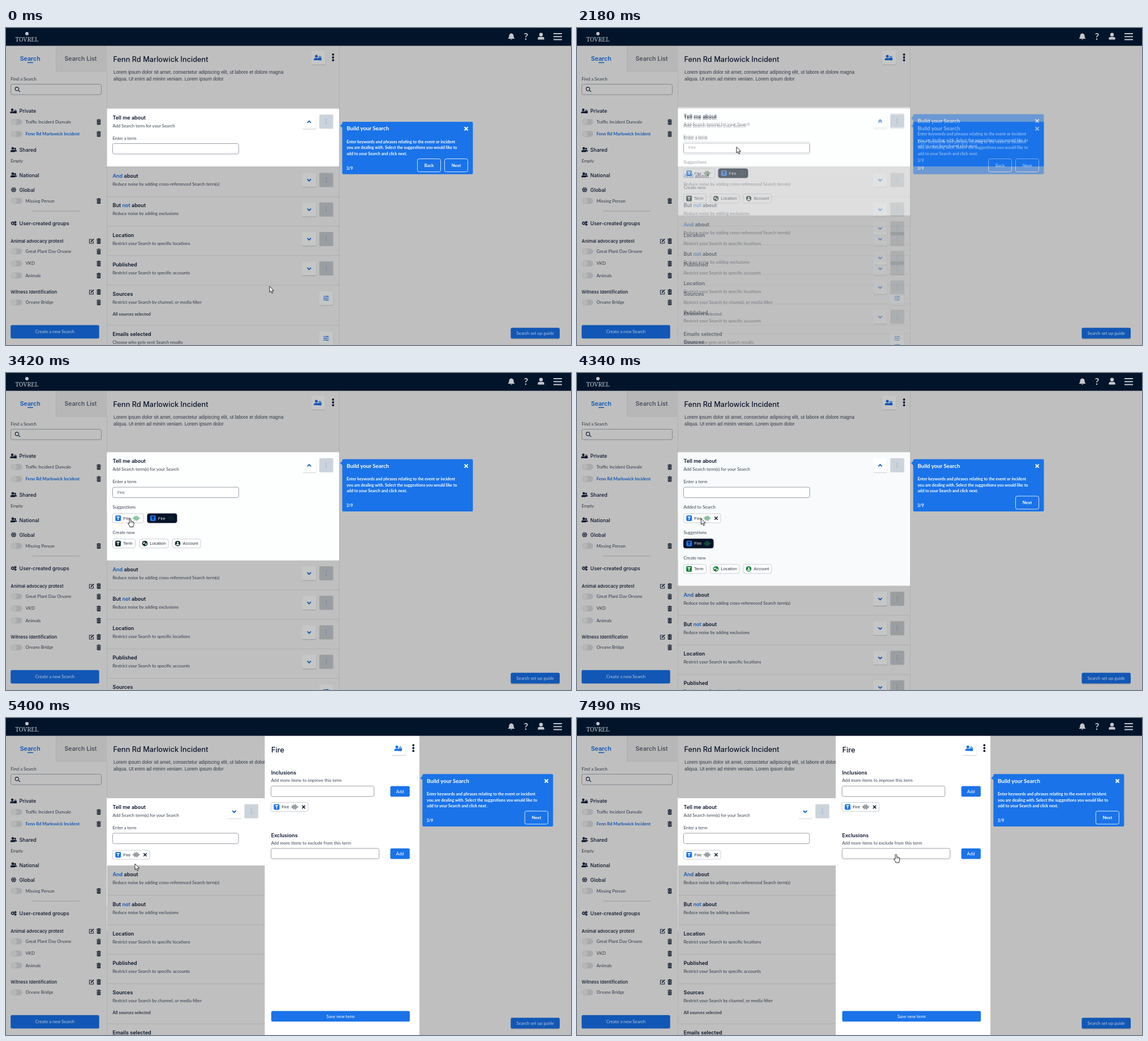
An HTML page that plays this animation: 999 by 561 pixels, repeating every 8000 ms.

```html
<!DOCTYPE html>
<html lang="en">
<head>
<meta charset="utf-8">
<title>Search builder</title>
<style>
  html, body { margin: 0; width: 100%; height: 100%; overflow: hidden; background: #bfbfbf; }
  svg { display: block; width: 100%; height: 100%; }
  text { white-space: pre; }
</style>
</head>
<body>
<svg id="stage" viewBox="0 0 999 561"></svg>
<script>
const NAVY = '#0c162c', BODY = '#303846', BLUE = '#1a73e8', DIM_BLUE = '#1257b5';
const DIM = '#bfbfbf', DIM_BOX = '#c5c6c6', LINE = '#adaeaf';

const fonts = {
  title: ['Inter', 500, 12.75], tab: ['Inter', 600, 10.65], head: ['Inter', 600, 9.05],
  side: ['Inter', 500, 8.9], group: ['Inter', 500, 7.9],
  body: ['Lato', 400, 7.75], bold: ['Lato', 700, 7.7],
  tipTitle: ['Lato', 700, 9.7], tip: ['Lato', 700, 7.2],
  plain: ['Liberation Sans', 400, 8.36], chip: ['Liberation Sans', 400, 7.5],
  brand: ['Noto Serif', 400, 10.5], help: ['Lato', 700, 17]
};

// Drawing helpers; text is placed by the vertical centre of its capitals.
const text = (kind, x, y, str, fill = NAVY, anchor = 'start') => {
  const [family, weight, size] = fonts[kind];
  return `<text x="${x}" y="${y + size * .355}" font-family="${family}, sans-serif" font-weight="${weight}" font-size="${size}" fill="${fill}" text-anchor="${anchor}">${str}</text>`;
};
const rect = (x, y, w, h, fill, r = 0, stroke = 'none') =>
  `<rect x="${x}" y="${y}" width="${w}" height="${h}" rx="${r}" fill="${fill}" stroke="${stroke}"/>`;
const circle = (x, y, r, fill) => `<circle cx="${x}" cy="${y}" r="${r}" fill="${fill}"/>`;
const fillPath = (d, fill) => `<path d="${d}" fill="${fill}"/>`;
const stroke = (d, color, w = 1) => `<path d="${d}" fill="none" stroke="${color}" stroke-width="${w}"/>`;
const at = (x, y, body, scale = 1) => `<g transform="translate(${x} ${y}) scale(${scale})">${body}</g>`;
const input = (x, y, w) => rect(x, y, w, 18.5, '#fff', 3, '#9a9fa8');
const button = (x, y, w, h, label, fill, color) =>
  rect(x, y, w, h, fill, 2.5) + text('body', x + w / 2, y + h / 2, label, color, 'middle');

// Icons, centred on their position.
const cross = (x, y, s, color, w = 1.8) => at(x, y, stroke(`M${-s} ${-s}L${s} ${s}M${s} ${-s}L${-s} ${s}`, color, w));
const chevron = (x, y, up, color) => at(x, y, stroke(up ? 'M-3.2 1.6L0-1.6 3.2 1.6' : 'M-3.2-1.6L0 1.6 3.2-1.6', color, 1.9));
const dots = (x, y, color, gap = 4, r = 1.2) => [-gap, 0, gap].map(d => circle(x, y + d, r, color)).join('');
const person = (x, y, color, s = 1) => at(x, y, circle(0, -2.4, 2.3, color) + fillPath('M-4 4V2.5Q-4 .5-2 .5H2Q4 .5 4 2.5V4Z', color), s);
const people = (x, y, color) => person(x + 2.6, y, color, .75) + person(x - 1.6, y, color);
const lockedPeople = (x, y, color, s = 1) => at(x, y, person(-2, 0, color) +
  rect(1.2, -.2, 5, 4.4, color, .6) + stroke('M2.3 0V-1.4Q3.7-3.4 5.1-1.4V0', color), s);
const globe = (x, y, color) => at(x, y, circle(0, 0, 4.3, color) +
  stroke('M-4.3-1.4H4.3M-4.3 1.4H4.3M0-4.3Q-3.6 0 0 4.3Q3.6 0 0-4.3', DIM, .7));
const gear = (x, y, r, color) =>
  `<circle cx="${x}" cy="${y}" r="${r}" fill="none" stroke="${color}" stroke-width="1.3"/>` +
  `<circle cx="${x}" cy="${y}" r="${r + .9}" fill="none" stroke="${color}" stroke-width=".8" stroke-dasharray="1.1 1"/>`;
const trash = y => at(164, y, fillPath('M-3.8-4H-1.5L-1-5H1L1.5-4H3.8V-2.8H-3.8ZM-3.2-2.2H3.2V4Q3.2 5 2.2 5H-2.2Q-3.2 5-3.2 4Z', '#1c2536') +
  stroke('M-1.4-1V3.6M1.4-1V3.6', DIM, .7));
const pencil = y => at(151, y, stroke('M1-3H-3.5V4H3.5V0', '#1c2536', 1.1) + stroke('M-1 1.5L4-3.6', '#1c2536', 2));
const sliders = (x, y, color) => at(x, y, stroke('M-5-3.2H5M-5 0H5M-5 3.2H5', color, 1) +
  stroke('M2-4.4V-2M-2-1.2V1.2M1 2V4.4', color, 1.3));
const wave = (x, y, color) => `<g class="wave" stroke="${color}" stroke-width=".9">` + at(x, y,
  [1, 2.4, 4.4, 3, 5, 3.6, 2, .8].map((h, i) => `<path d="M${i * 1.6 - 5.6} ${-h}V${h}"/>`).join('')) + '</g>';

const raised = (x, y, icon, fill) => rect(x + .4, y + 1, 24.2, 24.6, 'rgba(0,0,0,.18)', 2) + rect(x, y, 24.5, 24.5, fill, 2) + icon;
const chevronBox = (x, y, up, lit) =>
  raised(x, y, chevron(x + 12.2, y + 12.4, up, lit ? '#1660cc' : DIM_BLUE), lit ? '#fff' : DIM_BOX);
const kebabBox = (x, y, lit) => rect(x, y, 24.5, 25, lit ? '#ccd3da' : '#9b9ea1', 1.5) +
  dots(x + 12.2, y + 12.5, lit ? '#8fb4e2' : '#6d88ad', 3.7, 1.1);

const tIcon = (x, y, color, ink = '#fff') => rect(x - 5, y - 5, 10, 10, color, 2) + at(x, y, stroke('M-2.6-2.3H2.6M0-2.3V3', ink, 1.5));
const chip = (x, y, w, { dark, waveColor, closable }) =>
  rect(x, y, w, 16, dark ? '#051328' : '#fff', 3, dark ? '#051328' : '#c9ced4') +
  tIcon(x + 9.8, y + 8, BLUE, dark ? '#051328' : '#fff') +
  text('chip', x + 18.8, y + 8, 'Fire', dark ? '#e4e9f0' : '#2b3442') + wave(x + 41.8, y + 8, waveColor) +
  (closable ? cross(x + 57.5, y + 8, 2.7, NAVY, 1.5) : '');

const createRow = (y, color) => [['Term', 188.5, 40], ['Location', 236, 51], ['Account', 294, 50]].map(([label, x, w], i) => {
  const cx = x + 9.6, cy = y + 8;
  const icon = i === 0 ? tIcon(cx, cy, color) : circle(cx, cy, 4.8, color) +
    (i === 1 ? at(cx, cy, fillPath('M-3.5-1L-.5-3 0-.5-2 1ZM1-.5L3.6 0 2 3 .5 2Z', '#fff')) : person(cx, cy + .4, '#fff', .65));
  return rect(x, y, w, 16, '#fff', 3, '#c9ced4') + icon + text('chip', x + 18.5, cy, label, '#2b3442');
}).join('');

const toggleRow = (y, label, selected) => rect(8.5, y - 5.2, 20, 10.4, '#a8a9aa', 5.2) + circle(14, y, 5, '#b6b7b7') +
  text(selected ? 'bold' : 'body', 34.6, y, label, selected ? DIM_BLUE : BODY) + trash(y);

const CASE_NAME = 'Fenn Rd Marlowick Incident';

function header() {
  const ink = '#c3c7cc';
  return rect(0, 0, 999, 31.5, '#01142a') + circle(37, 10, 3, ink) + text('brand', 37, 20, 'TOVREL', ink, 'middle') +
    at(893.5, 15, fillPath('M-6 4Q-4 2-4-1Q-4-5 0-5.6Q4-5 4-1Q4 2 6 4ZM-1.6 4.8H1.6Q0 7.4-1.6 4.8Z', ink)) +
    text('help', 919.5, 15.3, '?', ink, 'middle') + person(946, 15, ink, 1.4) +
    stroke('M968 10H983M968 15.2H983M968 20.4H983', ink, 2);
}

function sidebar() {
  const heading = (y, label) => text('side', 23.6, y, label);
  const group = (y, label) => text('group', 8.3, y, label) + pencil(y) + trash(y);
  return rect(88.5, 32, 90, 44.5, '#b7b7b7') + stroke('M88.5 32V76.5H178.5V561', LINE) +
    text('tab', 42.7, 54, 'Search', DIM_BLUE, 'middle') + rect(38, 60.5, 10, 1.5, DIM_BLUE) +
    text('tab', 132, 54, 'Search List', '#4b525c', 'middle') +
    text('body', 8.3, 90, 'Find a Search', BODY) + rect(8.5, 99.5, 160, 18.5, DIM, 3, '#80858d') +
    at(20, 108.5, stroke('M2.2 1.8L5 4.6M2.6-.7A3.2 3.2 0 1 1-3.8-.7A3.2 3.2 0 1 1 2.6-.7', NAVY, 1.1)) +
    lockedPeople(13, 147, NAVY, .95) + heading(147, 'Private') +
    toggleRow(166.3, 'Traffic Incident Dunvale') + toggleRow(187.5, CASE_NAME, true) +
    people(13.5, 215.5, NAVY) + heading(215.7, 'Shared') + text('body', 8.3, 235, 'Empty', BODY) +
    people(13.5, 260.3, NAVY) + heading(260.5, 'National') +
    globe(13.5, 286.3, NAVY) + heading(286.6, 'Global') + toggleRow(306, 'Missing Person') +
    stroke('M46 324H130', '#979a9c') +
    gear(11.8, 345.5, 2, NAVY) + gear(16.5, 343.6, 1, NAVY) + gear(16.5, 347.8, 1, NAVY) + heading(345.7, 'User-created groups') +
    group(377, 'Animal advocacy protest') + toggleRow(395.4, 'Great Plant Day Orvane') +
    toggleRow(416.7, 'VKD') + toggleRow(438, 'Animals') +
    group(467, 'Witness Identification') + toggleRow(485.6, 'Orvane Bridge') +
    button(8.2, 525.7, 156.5, 23.7, 'Create a new Search', DIM_BLUE, '#b9c6d8');
}

function sections(dy) {
  const blue = word => `<tspan fill="${DIM_BLUE}">${word}</tspan>`;
  const folded = [
    [blue('And') + ' about', 'Reduce noise by adding cross-referenced Search term(s)'],
    [`But ${blue('not')} about`, 'Reduce noise by adding exclusions'],
    ['Location', 'Restrict your Search to specific locations'],
    ['Published', 'Restrict your Search to specific accounts']
  ].map(([name, note], i) => {
    const y = 262 + 52.2 * i;
    return text('head', 188.5, y, name) + text('body', 188.5, y + 14.4, note, BODY) +
      chevronBox(523.8, y - 5.3, false) + kebabBox(554, y - 5.5) + stroke(`M179 ${y + 36.4}H589`, LINE);
  }).join('');
  const filter = (y, name, note) => text('head', 188.5, y, name) + text('body', 188.5, y + 14.4, note, BODY) +
    raised(554, y - 4.7, sliders(566, y + 7.5, DIM_BLUE), DIM_BOX);
  return at(0, dy, folded + filter(470.6, 'Sources', 'Restrict your Search by channel, or media filter') +
    text('bold', 188.5, 506, 'All sources selected', BODY) + stroke('M179 526H589', LINE) +
    filter(541.7, 'Emails selected', 'Choose who gets sent Search results'));
}

function tooltip(x, y, labels) {
  const lines = ['Enter keywords and phrases relating to the event or incident',
    'you are dealing with. Select the suggestions you would like to', 'add to your Search and click next.'];
  const outlined = label => {
    const bx = label === 'Back' ? 133 : 181;
    return rect(bx, 65.5, 41, 23, 'none', 3, '#d5e4fb') + text('bold', bx + 20.6, 76.8, label, '#fff', 'middle');
  };
  return at(x, y, rect(0, 0, 231, 92.7, BLUE, 2) + fillPath('M.5 3L-3.8 7 .5 11Z', BLUE) +
    text('tipTitle', 7.7, 11.8, 'Build your Search', '#fff') + cross(219.2, 12.2, 3, '#fff', 2) +
    lines.map((line, i) => text('tip', 7.7, 35.5 + 10.4 * i, line, '#fff')).join('') +
    text('tip', 7.2, 82.4, '3/9', '#fff') + labels.map(outlined).join(''));
}

function scene({ top, bottom, shift, dy, fill = '#fff', plural = true, compact, content, tip }) {
  const bx = compact ? 391.3 : 523.8;
  return rect(179, 32, 820, 529, DIM) + stroke('M589 32V561', LINE) +
    text('title', 189.5, 55, CASE_NAME) +
    text('plain', 190, 78, 'Lorem ipsum dolor sit amet, consectetur adipiscing elit, ut labore et dolore magna', BODY) +
    text('plain', 190, 90.4, 'aliqua. Ut enim ad minim veniam. Lorem ipsum dolor', BODY) +
    raised(540, 40.2, lockedPeople(551, 52.6, DIM_BLUE, 1.1), DIM_BOX) + dots(578.3, 52, NAVY, 5, 1.9) +
    sections(dy) + rect(178.5, top, 410.5, bottom - top, fill) +
    at(0, shift, text('head', 188.5, 158.4, 'Tell me about') +
      text('body', 188.5, 173, `Add Search term${plural ? '(s)' : ''} for your Search`, '#3a4452') +
      chevronBox(bx, 153.8, !compact, true) + kebabBox(bx + 30.2, 153.2, true) +
      text('body', 188.5, 195, 'Enter a term', '#3a4452') + input(188.5, 204.5, compact ? 222.5 : 223)) +
    content + tooltip(...tip) +
    rect(892.3, 531, 87, 20, 'rgba(0,0,0,.15)', 3) +
    button(892.5, 530.5, 86.5, 19, 'Search set up guide', DIM_BLUE, '#b9c6d8');
}

function termPanel() {
  const block = (y, name, note, w) => text('head', 468.7, y, name) + text('body', 468.7, y + 13.7, note, '#3a4452') +
    input(468.7, y + 23.4, w) + button(679.5, y + 23.5, 34.3, 18.7, 'Add', BLUE, '#fff');
  return rect(457.5, 31.5, 273.5, 529.5, '#fff') + text('title', 469, 56, 'Fire') +
    raised(682, 41.3, lockedPeople(693.3, 53.8, BLUE, 1.1), '#fff') + dots(720.3, 53.2, NAVY, 5, 1.9) +
    block(97, 'Inclusions', 'Add more items to improve this term', 182) +
    chip(468.7, 149.4, 65.5, { closable: true, waveColor: '#4a535f' }) +
    block(207.3, 'Exclusions', 'Add more items to exclude from this term', 191) +
    button(469, 518.5, 245, 18.7, 'Save new term', BLUE, '#fff');
}

const label = (y, str) => text('body', 188.5, y, str, '#3a4452');
const scenes = [
  scene({ top: 142.7, bottom: 245, shift: 0, dy: 0, plural: false, content: '', tip: [594.5, 166, ['Back', 'Next']] }),
  scene({ top: 140.2, bottom: 331.7, shift: -2.4, dy: 85.5, fill: '#fdfefe', tip: [594.5, 152.4, []],
    content: text('chip', 197, 211.4, 'Fire', '#59616c') + label(237.6, 'Suggestions') +
      chip(188.5, 249, 55, { waveColor: '#1d4d38' }) + chip(250, 249, 52, { dark: true, waveColor: '#0d2f35' }) +
      label(282.5, 'Create new') + createRow(293.7, '#0b2a26') }),
  scene({ top: 140.2, bottom: 376.5, shift: -2.4, dy: 130.6, fill: '#f8fafb', tip: [594.5, 152.4, ['Next']],
    content: label(237.6, 'Added to Search') + chip(188.5, 249, 65.5, { closable: true, waveColor: '#2e8f50' }) +
      label(282.5, 'Suggestions') + chip(188.5, 293.8, 52.5, { dark: true, waveColor: '#1d7a45' }) +
      label(327.2, 'Create new') + createRow(338.7, '#12823b') }),
  scene({ top: 142, bottom: 261, shift: -.6, dy: 15.2, compact: true, tip: [736.3, 99.3, ['Next']],
    content: chip(188.5, 234, 65.5, { closable: true, waveColor: '#4a535f' }) + termPanel() })
];

const outline = d => `<path d="${d}" fill="#fff" stroke="#111" stroke-width=".9" stroke-linejoin="round"/>`;
const arrow = outline('M0 0V10.6L2.4 8.4 4.2 12.4 6 11.6 4.3 7.8H7.6Z');
const hand = outline('M-1.3 1.2Q0-.8 1.3 1.2V5Q2.6 4 3.2 5.4 4.6 4.6 5 6 6.5 5.6 6.6 7.2V10Q6.4 12 5.4 13V15H-.6V13.4Q-2.5 11.5-3.8 8.6-3.6 7-1.3 9Z') +
  stroke('M1.3 5V8M3.2 5.6V8M5 6.4V8.3', '#111', .6);

document.getElementById('stage').innerHTML = sidebar() +
  scenes.map((body, i) => `<g id="scene${i}">${body}</g>`).join('') + header() +
  `<g id="cursor"><circle id="ring" r="9.5" fill="rgba(90,100,115,.25)"/><g id="arrow">${arrow}</g><g id="hand">${hand}</g></g>`;

const LOOP = 8000;
// Cursor stops: time, x, y.
const path = [
  [0, 466, 457], [300, 466, 457], [700, 392, 345], [1090, 316, 235], [1170, 308, 229], [1590, 282, 210.5],
  [2500, 282, 210.5], [2960, 250, 234], [3420, 219.5, 257.5], [5080, 219.5, 257.5], [5270, 228, 258],
  [5400, 228, 258], [5890, 288, 256], [6720, 510, 222], [7000, 542, 215], [7490, 564, 241], [LOOP, 564, 241]
];

const slope = (i, axis) => path[i] && path[i + 1]
  ? (path[i + 1][axis] - path[i][axis]) / (path[i + 1][0] - path[i][0]) : 0;
const tangent = (i, axis) => {
  const a = slope(i - 1, axis), b = slope(i, axis);
  return a * b > 0 ? 2 * a * b / (a + b) : 0;
};

// Monotone cubic through the stops: no overshoot and true rests.
function cursorAt(t, axis) {
  const i = path.findIndex((p, k) => t < path[k + 1][0]);
  const span = path[i + 1][0] - path[i][0], u = (t - path[i][0]) / span;
  const ease = u * u * (3 - 2 * u);
  return path[i][axis] * (1 - ease) + path[i + 1][axis] * ease +
    span * u * (1 - u) * ((1 - u) * tangent(i, axis) - u * tangent(i + 1, axis));
}

const between = (t, ...ranges) => ranges.some(([from, to]) => t >= from && t < to);
const step = (t, ...changes) => changes.reduce((value, [time, next]) => t >= time ? next : value, 0);
const show = (id, opacity) => {
  const el = document.getElementById(id);
  el.style.display = opacity ? '' : 'none';
  el.style.opacity = opacity;
};
const suggestionWave = document.querySelector('#scene1 .wave');

function draw(now) {
  const t = now % LOOP;
  show('scene1', step(t, [2180, .5], [2250, 1]));
  show('scene2', step(t, [4200, .35], [4270, .7], [4340, 1]));
  show('scene3', step(t, [5400, 1]));
  suggestionWave.setAttribute('stroke', t < 3150 ? '#1d4d38' : '#2e9a55');

  const pointing = between(t, [1300, 2180], [3150, 4340], [6700, LOOP]);
  show('hand', +pointing);
  show('arrow', +!pointing);
  show('ring', +between(t, [2040, 2180], [4070, 4200]));
  document.getElementById('cursor').setAttribute('transform', `translate(${cursorAt(t, 1)} ${cursorAt(t, 2)})`);
}

const start = performance.now();
(function tick() {
  draw(performance.now() - start);
  requestAnimationFrame(tick);
})();
</script>
</body>
</html>
```
